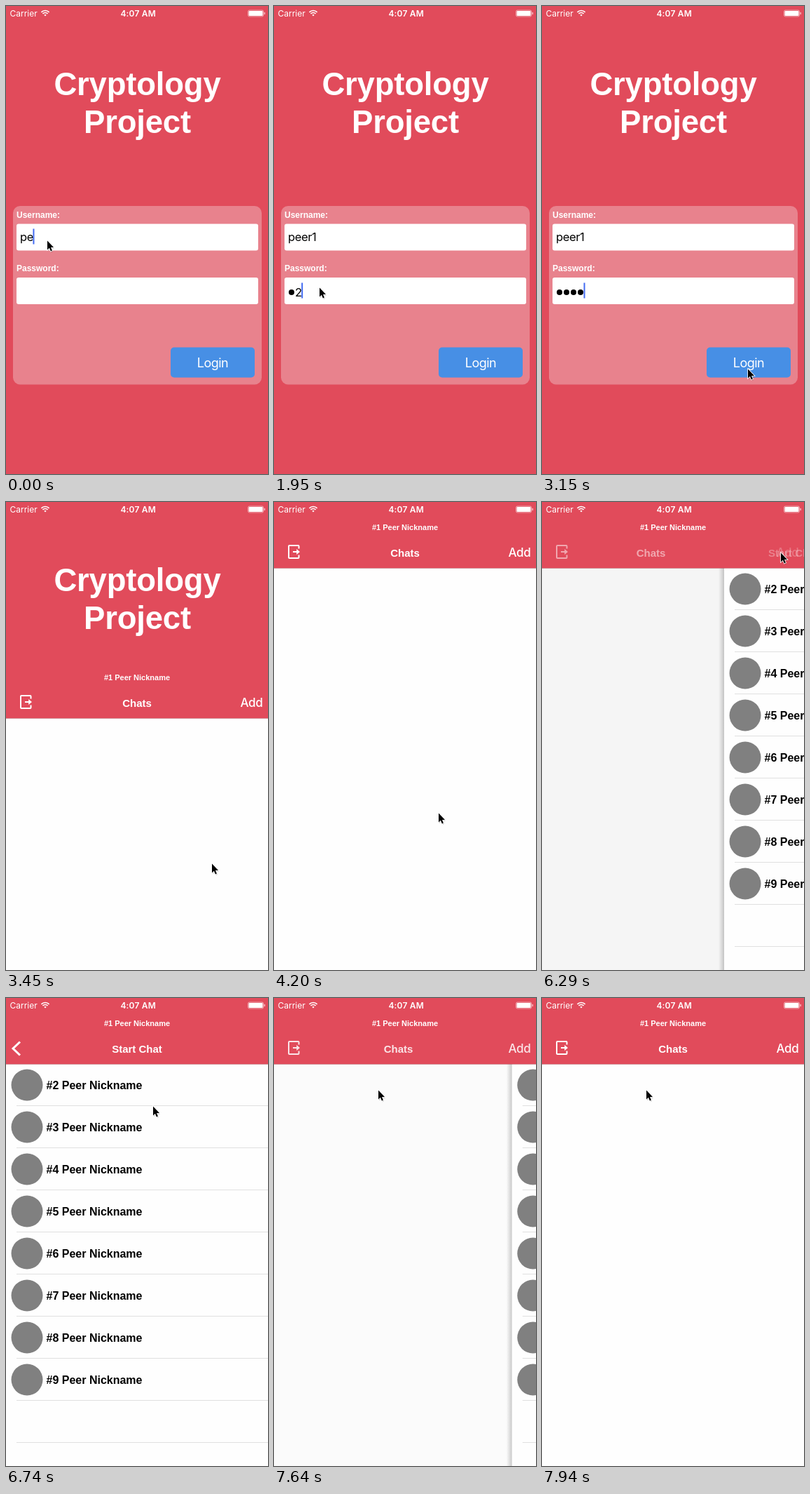
An HTML page for the animation above (8000 ms loop, 374x667 px).

```html
<!DOCTYPE html>
<html lang="en">
<head>
<meta charset="utf-8">
<title>Cryptology Project</title>
<style>
  html, body { margin: 0; width: 100%; height: 100%; overflow: hidden; background: #e14b5b; }
  svg { display: block; width: 374px; height: 667px; }
  text { font-family: "Liberation Sans", Arial, sans-serif; font-weight: 700; fill: #fff; white-space: pre; }
  .ui { font-family: Inter, sans-serif; font-weight: 400; }
  .mid { text-anchor: middle; }
  .title { font-size: 45.5px; letter-spacing: -.2px; }
  .label { font-size: 12px; }
  .head { font-size: 15px; }
  .field { font-size: 16.5px; letter-spacing: -.4px; fill: #000; }
  .row text { font-size: 16px; fill: #000; }
  .row circle { fill: #808080; }
</style>
</head>
<body>
<svg viewBox="0 0 374 667">
  <defs>
    <linearGradient id="edge">
      <stop offset="0" stop-color="#000" stop-opacity="0"/>
      <stop offset="1" stop-color="#000" stop-opacity=".2"/>
    </linearGradient>
  </defs>
  <rect width="374" height="667" fill="#e14b5b"/>
  <text class="title mid" x="187.5" y="127">Cryptology</text>
  <text class="title mid" x="187.5" y="180.5">Project</text>

  <g id="login">
    <rect x="10" y="285" width="355" height="254.5" rx="10" fill="#e8828d"/>
    <text class="label" x="15" y="302">Username:</text>
    <text class="label" x="15" y="378">Password:</text>
    <rect x="15" y="310.5" width="345" height="38" rx="3" fill="#fff"/>
    <rect x="15" y="387" width="345" height="38" rx="3" fill="#fff"/>
    <text id="user" class="ui field" x="20" y="335"></text>
    <g id="dots"></g>
    <text id="digit" class="ui field" y="413.5"></text>
    <rect id="caret" width="2" height="22" fill="#426bf2"/>
    <rect x="235" y="486.5" width="120" height="43" rx="5" fill="#478fe5"/>
    <text class="ui mid" x="295" y="514.5" font-size="18" letter-spacing="-.5">Login</text>
  </g>

  <g id="chats">
    <rect y="94" width="374" height="667" fill="#fefefe"/>
    <rect id="dim" y="94" width="374" height="667"/>
    <g id="list">
      <rect x="-8" y="94" width="8" height="573" fill="url(#edge)"/>
      <rect y="94" width="374" height="573" fill="#fefefe"/>
      <g id="rows"></g>
    </g>
    <rect y="16" width="374" height="78" fill="#e14b5b"/>
    <rect y="94" width="374" height=".5" fill="#a93845"/>
    <text class="mid" x="187" y="40" font-size="11">#1 Peer Nickname</text>
    <g id="exit" fill="none" stroke="#fff" stroke-width="2">
      <path d="M35.500 66.500V63q0-1-1-1H22q-1 0-1 1V79q0 1 1 1H34.500q1 0 1-1V75.500"/>
      <path d="M27 70h5.200v-3l4.800 4-4.800 4v-3H27z" fill="#fff" stroke="none"/>
    </g>
    <path id="back" d="M20 62.500L10 72L20 81.500" fill="none" stroke="#fff" stroke-width="3"/>
    <text id="home" class="head mid" x="187" y="78">Chats</text>
    <text id="start" class="head mid" x="187" y="78">Start Chat</text>
    <text id="add" class="ui" x="334.500" y="78" font-size="17" letter-spacing="-.4" style="font-weight:500">Add</text>
  </g>

  <g id="status">
    <text class="ui" x="5.500" y="14.500" font-size="12">Carrier</text>
    <g fill="none" stroke="#fff" stroke-width="1.700">
      <path d="M50.400 8.800a8 8 0 0 1 11.200 0M52.400 11a5.200 5.200 0 0 1 7.200 0"/>
      <path d="M54.300 12.700a2.500 2.500 0 0 1 3.400 0L56 14.500z" fill="#fff" stroke="none"/>
    </g>
    <text class="ui mid" x="188.700" y="14.500" font-size="12" letter-spacing=".2" style="font-weight:600">4:07 AM</text>
    <rect x="345.500" y="6" width="22" height="9" rx="2" fill="none" stroke="#fff" stroke-opacity=".5"/>
    <rect x="346.500" y="7" width="20" height="7" rx="1" fill="#fff"/>
    <rect x="368.500" y="8.800" width="1.300" height="3.400" rx=".6" fill="#fff" opacity=".7"/>
  </g>

  <g id="cursor">
    <path d="M1 2.500V15L4 12.500 6 17 8 16 6 11.800H10z" fill="#000" opacity=".2"/>
    <path d="M0 .5V13.500L2.900 10.800 4.900 15.400 6.900 14.500 5 10H9z" stroke="#fff" paint-order="stroke" stroke-width="1.600"/>
  </g>
</svg>
<script>
const LOOP = 8000, STEP = 150, SEAM = 5540;
const $ = id => document.getElementById(id);
const set = (id, name, value) => $(id).setAttribute(name, value);
const move = (id, x, y = 0) => set(id, 'transform', `translate(${x} ${y})`);
const show = (id, on) => set(id, 'visibility', on ? 'visible' : 'hidden');
const clamp = v => Math.min(1, Math.max(0, v));
const span = (t, from, length) => clamp((t - from) / length);
const smooth = u => u * u * (3 - 2 * u);
const settle = u => 1 - (1 - u) ** 3.45;

// Pointer path: time, x, y
const path = [
  [900, 59, 334], [1350, 67, 401], [1500, 65, 401], [2400, 65, 401],
  [2700, 130, 440], [3150, 294, 517], [3450, 294, 515], [3750, 290, 512],
  [4200, 235, 443], [4350, 222, 353], [4800, 165, 150], [4950, 156, 110],
  [5100, 170, 88], [5250, 205, 85], [5540, 263, 110], [5840, 341, 72],
  [6290, 341, 72], [6440, 325, 86], [6740, 210, 154], [7040, 146, 129],
  [7190, 149, 131]
];

function pointAt(t) {
  const i = path.findIndex(p => p[0] > t);
  if (i === 0) return path[0].slice(1);
  if (i < 0) return path[path.length - 1].slice(1);
  const [a, b] = [path[i - 1], path[i]];
  const u = (t - a[0]) / (b[0] - a[0]);
  return [a[1] + (b[1] - a[1]) * u, a[2] + (b[2] - a[2]) * u];
}

for (let i = 0; i < 9; i++) {
  const y = 94 + i * 60;
  const person = i < 8
    ? `<circle cx="30" cy="${y + 30}" r="22.500"/><text x="57.500" y="${y + 36}">#${i + 2} Peer Nickname</text>`
    : '';
  $('rows').innerHTML += `<g class="row">${person}<rect x="15" y="${y + 59}" width="359" height="1" fill="#e0e0e0"/></g>`;
}
for (let i = 0; i < 4; i++) {
  $('dots').innerHTML += `<circle cx="${25 + i * 10}" cy="408" r="4"/>`;
}

const passed = (t, times) => times.filter(k => t >= k).length;

function drawLogin(t) {
  const sent = t >= 3300;
  const typed = passed(t, [1650, 1950, 2100, 2400]);
  const masked = t >= 3000 ? 4 : Math.max(0, typed - 1);
  const inPassword = t >= 1500;
  $('user').textContent = sent ? '' : 'peer1'.slice(0, 2 + passed(t, [300, 450, 750]));
  $('digit').textContent = sent || masked === typed ? '' : typed;
  set('digit', 'x', 20 + masked * 10);
  [...$('dots').children].forEach((dot, i) => dot.setAttribute('opacity', !sent && i < masked ? 1 : 0));
  const end = inPassword
    ? masked * 10 + $('digit').getComputedTextLength()
    : $('user').getComputedTextLength();
  set('caret', 'x', 19.5 + end);
  set('caret', 'y', inPassword ? 394.5 : 317.5);
  set('caret', 'opacity', sent ? 0 : 1);
}

function drawChats(t) {
  move('chats', 0, 214 * (1 - smooth(span(t, 3550, 500))));
  const p = settle(span(t, 6240, 500)) - settle(span(t, 7360, 560));
  const pressed = t >= 6140 && t < 6740;
  const fade = clamp(1 - 1.6 * p);
  move('list', 374 * (1 - p));
  set('list', 'opacity', p > 0 ? 1 : 0);
  set('dim', 'opacity', .12 * p);
  move('home', -103 * p);
  set('home', 'opacity', fade);
  set('exit', 'opacity', fade);
  set('add', 'opacity', fade * (pressed ? .45 : 1));
  move('start', 247 * (1 - p));
  set('start', 'opacity', p);
  set('back', 'opacity', clamp((p - .4) / .6));
}

function hold(t) {
  const base = t < SEAM ? 0 : SEAM;
  return base + Math.floor((t - base) / STEP) * STEP;
}

function draw(t) {
  const inside = t >= 3450;
  show('login', !inside);
  show('chats', inside);
  if (inside) drawChats(t); else drawLogin(t);
  move('cursor', ...pointAt(t));
}

const origin = performance.now();
function tick() {
  draw(hold((performance.now() - origin) % LOOP));
  requestAnimationFrame(tick);
}
tick();
</script>
</body>
</html>
```
